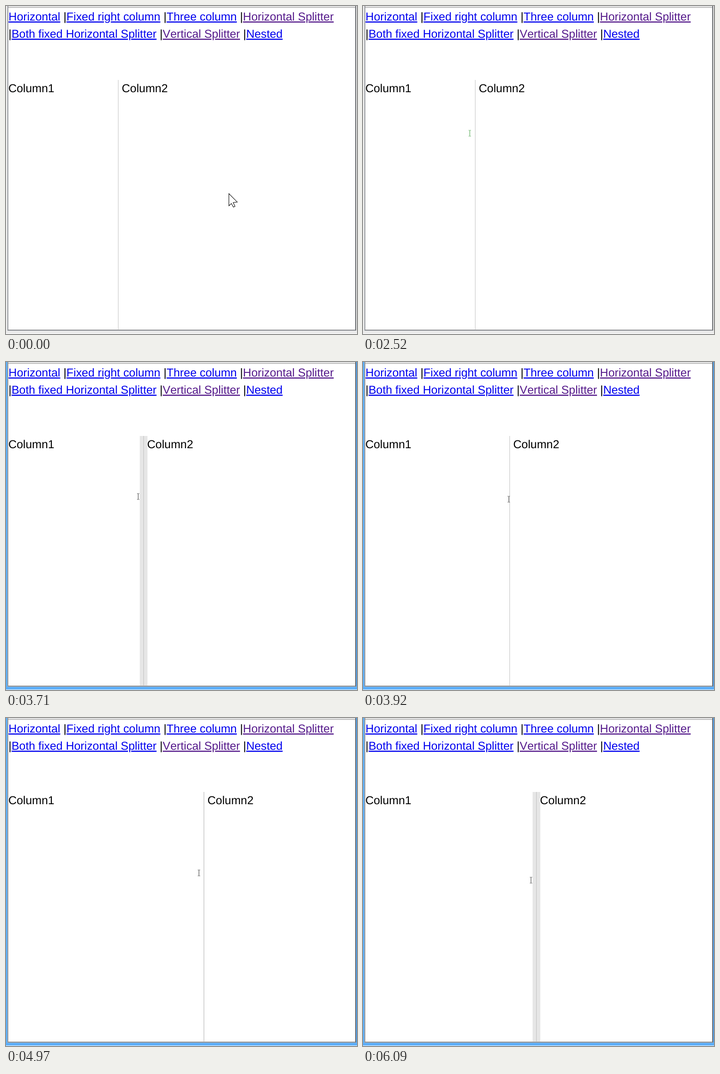
An HTML page that plays this animation: 774 by 723 pixels, repeating every 6720 ms.

```html
<!DOCTYPE html>
<html lang="en">
<head>
<meta charset="utf-8">
<title>Column splitter</title>
<style>
  html, body { margin: 0; width: 100%; height: 100%; overflow: hidden; background: #fff; }
  svg { display: block; width: 774px; height: 723px; }
  text {
    font: 25.35px "Liberation Sans", Arial, sans-serif;
    font-kerning: none;
    text-rendering: geometricPrecision;
    white-space: pre;
  }
  .link, .seen { text-decoration: underline; text-decoration-skip-ink: none; }
  .link { fill: #00e; }
  .seen { fill: #551a8b; }
</style>
</head>
<body>
<svg viewBox="0 0 774 723">
  <rect id="border" width="774" height="722" fill="#ebebeb"/>
  <g shape-rendering="crispEdges">
    <rect x="3" width="769" height="716" fill="#a9adb2"/>
    <rect x="4" width="767" height="715" fill="#7c7e82"/>
    <rect x="771" width="1" height="715" fill="#4a4c50"/>
    <rect x="5" width="765" height="713" fill="#fff"/>
    <rect x="5" width="765" height="3" fill="#e1e1e1"/>
    <rect x="5" y="3" width="765" height="1" fill="#a0a0a0"/>
    <rect x="5" y="713" width="765" height="1" fill="#c4c4c4"/>
  </g>
  <text x="5.6" y="32"><tspan class="link">Horizontal</tspan> |<tspan class="link">Fixed right column</tspan> |<tspan class="link">Three column</tspan> |<tspan class="seen">Horizontal Splitter</tspan></text>
  <text x="5.6" y="70">|<tspan class="link">Both fixed Horizontal Splitter</tspan> |<tspan class="seen">Vertical Splitter</tspan> |<tspan class="link">Nested</tspan></text>
  <text x="5.2" y="190">Column1</text>
  <g id="split">
    <rect id="band" x="-8" y="163" width="17" height="550" fill="#e6e6e6"/>
    <rect id="line" y="163" width="1" height="550" fill="#c0c0c0"/>
    <text x="8.3" y="190">Column2</text>
  </g>
  <path id="arrow" d="M.5 .5V27.5L6 22.3L10.4 30.2L14 28.7L10 20.3L19 19.2Z" fill="#fff" stroke="#000" stroke-width="1.1"/>
  <path id="beam" d="M-2.5 -6.5H-.5M.5 -6.5H2.5M0 -6V6M-2.5 6.5H-.5M.5 6.5H2.5" fill="none" stroke-width="1.1"/>
</svg>
<script>
  const LOOP = 6720, TICK = 70, GAP = 12;

  // [ms, x, y] of each pointer
  const arrowPath = [
    [630, 491, 413], [1330, 340, 338], [1680, 295, 320],
    [1750, 295, 320], [2380, 235, 276]
  ];
  const beamPath = [
    [3010, 235, 280], [3640, 291, 296], [3710, 291.5, 296],
    [4200, 362, 312], [4270, 368, 314], [4410, 368, 314],
    [4550, 378, 318], [4690, 378, 318], [4900, 424, 340],
    [4970, 425, 341], [5040, 429, 343], [5320, 429, 343],
    [5950, 378, 356], [6020, 370.5, 357], [6090, 370, 357.5]
  ];

  const el = id => document.getElementById(id);
  const [border, split, band, line, arrow, beam] =
    ["border", "split", "band", "line", "arrow", "beam"].map(el);

  function at(path, t) {
    let a = path[0];
    for (const b of path) {
      if (t < b[0]) {
        const k = Math.max(0, (t - a[0]) / (b[0] - a[0] || 1));
        return [a[1] + (b[1] - a[1]) * k, a[2] + (b[2] - a[2]) * k];
      }
      a = b;
    }
    return [a[1], a[2]];
  }

  const show = (node, on) => node.setAttribute("visibility", on ? "visible" : "hidden");
  const move = (node, x, y) => node.setAttribute("transform", `translate(${x} ${y})`);

  function draw(ms) {
    const t = Math.floor((ms % LOOP) / TICK) * TICK;
    const active = t >= 2870;

    border.setAttribute("fill", active ? "#5caef8" : "#ebebeb");

    const [ax, ay] = at(arrowPath, t);
    show(arrow, t < 2450);
    move(arrow, Math.round(ax), Math.round(ay));

    const [bx, by] = at(beamPath, t);
    show(beam, t >= 2520);
    beam.setAttribute("stroke", active ? "#3c3c3c" : "#4ea64e");
    move(beam, Math.floor(bx) + .5, Math.floor(by) + .5);

    // the splitter trails the pointer by one tick
    move(split, Math.floor(at(beamPath, t - TICK)[0] + GAP), 0);
    show(band, (t >= 3080 && t < 3850) || t >= 6090);
    line.setAttribute("fill", t >= 4760 && t < 5390 ? "#acacac" : "#c0c0c0");
  }

  const start = performance.now();
  function frame() {
    draw(performance.now() - start);
    requestAnimationFrame(frame);
  }
  frame();
</script>
</body>
</html>
```
